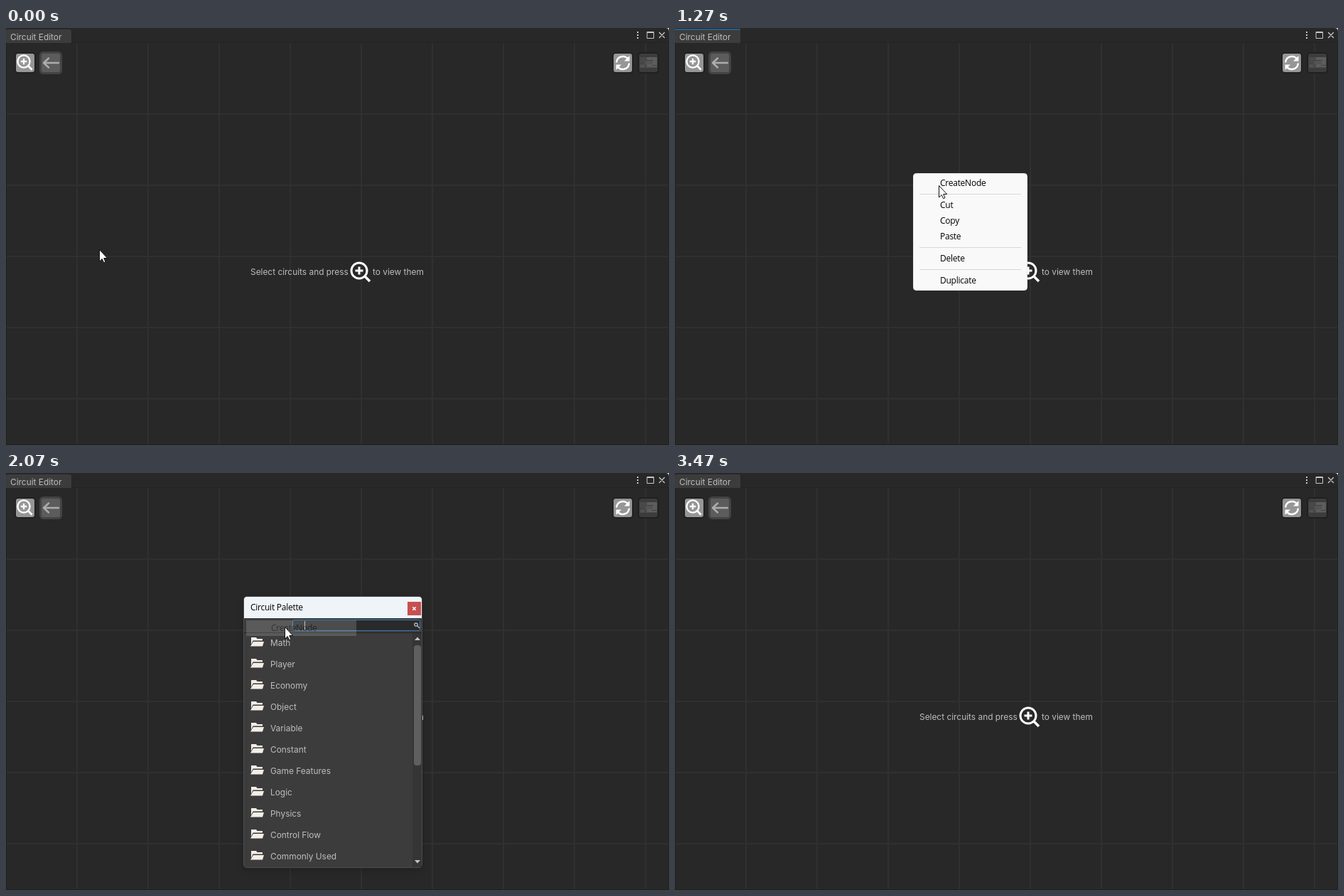
Animation, 933 px wide and 586 px high, one loop 3.54 s. Source, as an HTML page:

```html
<!DOCTYPE html>
<html lang="en">
<head>
<meta charset="utf-8">
<title>Circuit Editor</title>
<style>
  html, body { margin: 0; width: 100%; height: 100%; overflow: hidden; background: #282828; }
  svg { display: block; width: 100%; height: 100%; }
  text { white-space: pre; }
  .ui { font: 11.9px Inter, Roboto, sans-serif; fill: #bdbdbd; }
  .os { font: 12px "Open Sans", "Noto Sans", sans-serif; letter-spacing: -.25px; fill: #000; }
  .line { fill: none; stroke-linecap: round; stroke-linejoin: round; }
  #palette { filter: drop-shadow(0 3px 5px rgba(0, 0, 0, .2)); }
</style>
</head>
<body>
<svg viewBox="0 0 933 586">
  <defs>
    <g id="lens" class="line" stroke="#fff" stroke-width="3">
      <circle r="11"/>
      <path d="M-5.5 0H5.5M0-5.5V5.5" stroke-linecap="butt"/>
      <path d="M8 8L15 15" stroke-linecap="butt" stroke-width="3.6"/>
    </g>
    <g id="folder" fill="#f4eee9">
      <path d="M1 10V0H8L9.5 2H17V4.5H3.5Z"/>
      <path d="M0 12.5L4 6H19L17 12.5Z"/>
    </g>
  </defs>

  <rect width="933" height="586" fill="#282828"/>
  <path id="grid" fill="none" stroke="#303030" stroke-width="2"/>

  <rect y="20" width="933" height="1" fill="#222"/>
  <path d="M0 21V5Q0 2 3 2H89Q92 2 92 5V21Z" fill="#3c3c3c"/>
  <rect id="tabMark" y="1" width="92" height="2" fill="#2c5d87"/>
  <text class="ui" x="6" y="17">Circuit Editor</text>
  <path d="M.5 21V585.5H932.5V21" fill="none" stroke="#1f1f1f"/>
  <path d="M928 0H933V5Q933 0 928 0Z" fill="#ddd"/>

  <g fill="#c8c8c8">
    <rect x="888" y="5" width="2" height="2"/>
    <rect x="888" y="9" width="2" height="2"/>
    <rect x="888" y="13" width="2" height="2"/>
  </g>
  <g class="line" stroke="#c8c8c8">
    <rect x="902.5" y="5.5" width="9" height="9"/>
    <path d="M902.5 6.5H911.5"/>
    <path d="M919.5 6.5L926.5 13.5M926.5 6.5L919.5 13.5" stroke-width="1.4"/>
  </g>

  <g stroke="#202020" stroke-width="2">
    <rect x="13" y="35" width="28" height="28" rx="4" fill="#969696"/>
    <rect x="854" y="35" width="28" height="28" rx="4" fill="#969696"/>
    <rect x="890" y="35" width="28" height="28" rx="4" fill="#3c3c3c"/>
    <rect x="48.5" y="34.5" width="29" height="29" rx="4" fill="#5c5c5c" stroke="#434343" stroke-width="3"/>
  </g>
  <use href="#lens" transform="translate(25 47) scale(.78)"/>
  <path class="line" d="M53 49H74M60 42.5L53 49L60 55.5" stroke="#adadad" stroke-width="2.4"/>
  <g stroke="#fff">
    <g id="arc">
      <path class="line" d="M859.2 47.5A9 9 0 0 1 875.5 44" stroke-width="2.4"/>
      <path d="M877.5 39V46.5H870Z" fill="#fff" stroke="none"/>
    </g>
    <use href="#arc" transform="rotate(180 868 49)"/>
  </g>
  <g>
    <path d="M892 41H916V56H892Z" fill="#494949"/>
    <path d="M902 41H916V55H902Z" fill="#5d5d5d"/>
    <path d="M900 46H910V51H900ZM893 52H898V55H893Z" fill="#545454"/>
    <path d="M892 49H897V50H892ZM899 45H911V46H899ZM909 52H916V53H909Z" fill="#414141"/>
  </g>

  <text class="ui" x="344" y="347">Select circuits and press</text>
  <use href="#lens" x="497" y="341"/>
  <text class="ui" x="516" y="347">to view them</text>

  <g id="menu">
    <rect x="335.5" y="204.5" width="160" height="164" rx="4" fill="#f9f9f9" stroke="#e6e6e6"/>
    <path d="M344 233.5H487M344 308.5H487M344 339.5H487" stroke="#d7d7d7"/>
    <g id="menuText"></g>
  </g>

  <g id="palette">
    <rect x="334.5" y="173.5" width="251" height="381" rx="4.5" fill="#3c3c3c" stroke="#4c4c4c"/>
    <path id="caption" d="M335 204V178Q335 174 339 174H581Q585 174 585 178V204Z"/>
    <text class="os" x="344" y="193">Circuit Palette</text>
    <rect x="565" y="181" width="19" height="19" fill="#c75050"/>
    <path d="M572.3 188.3L576.7 192.7M576.7 188.3L572.3 192.7" stroke="#fff" stroke-width="1.5"/>
    <rect x="403.5" y="206.5" width="179" height="15" rx="2" fill="#2a2a2a" stroke="#3a79bb"/>
    <path d="M420.5 208V220" stroke="#b4b4b4"/>
    <g class="line" stroke="#c4c4c4" stroke-width="1.2">
      <circle cx="577" cy="213" r="2.2"/>
      <path d="M579 215L581.5 217.5"/>
    </g>
    <rect x="335" y="224" width="250" height="1" fill="#232323"/>
    <rect id="hover" x="335" width="237" height="30" fill="#303030"/>
    <g id="rows"></g>
    <rect x="572" y="225" width="13" height="329" fill="#353535"/>
    <rect x="574" y="242" width="10" height="169" rx="4" fill="#5f5f5f"/>
    <path d="M575 235L579 230.5L583 235ZM575 544L579 548.5L583 544Z" fill="#c4c4c4"/>
  </g>

  <g id="flash">
    <rect x="338" y="207" width="155" height="22" fill="#f0f0f0"/>
    <text class="os" x="373" y="222">CreateNode</text>
  </g>

  <path id="cursor" d="M.5 .5V17L4.2 13.5L6.7 18.7L9 17.7L6.7 12.5H11.7Z" fill="#fff" stroke="#111" stroke-linejoin="round"/>
</svg>
<script>
const LOOP = 3540, STEP = 200 / 3, LAST = 52;
const $ = id => document.getElementById(id);
const NS = "http://www.w3.org/2000/svg";

function add(parent, tag, attrs, text) {
  const el = document.createElementNS(NS, tag);
  for (const key in attrs) el.setAttribute(key, attrs[key]);
  if (text) el.textContent = text;
  parent.append(el);
}

let grid = "";
for (let x = 100; x < 933; x += 100) grid += `M${x} 21V585`;
for (let y = 121; y < 586; y += 100) grid += `M1 ${y}H932`;
$("grid").setAttribute("d", grid);

const commands = { CreateNode: 222, Cut: 253, Copy: 275, Paste: 297, Delete: 328, Duplicate: 359 };
for (const name in commands) {
  add($("menuText"), "text", { class: "os", x: 373, y: commands[name] }, name);
}

const groups = ["Math", "Player", "Economy", "Object", "Variable", "Constant",
  "Game Features", "Logic", "Physics", "Control Flow", "Commonly Used"];
groups.forEach((name, i) => {
  add($("rows"), "use", { href: "#folder", x: 344, y: 231 + 30 * i });
  add($("rows"), "text", { class: "ui", x: 372, y: 243 + 30 * i }, name);
});

const linear = p => p;
const smooth = p => p * p * (3 - 2 * p);
const easeOut = p => p * (1.25 - .25 * p);

// Pointer stops: tick, x, y, easing towards the stop
const stops = [
  [0, 131, 311, linear],
  [5, 336, 204, smooth],
  [8, 336, 204, linear],
  [12, 341, 207, smooth],
  [13, 341, 207, linear],
  [16, 349, 225, smooth],
  [22, 392, 216, smooth],
  [35, 392, 216, linear],
  [38, 373, 233, p => p * (.5 + .5 * p)],
  [43, 186, 483, easeOut],
  [45, 137, 546, linear]
];

function pointerAt(tick) {
  const i = stops.findIndex(s => s[0] >= tick);
  if (i < 0) return null;
  if (i === 0) return stops[0].slice(1, 3);
  const [t0, x0, y0] = stops[i - 1], [t1, x1, y1, ease] = stops[i];
  const p = ease((tick - t0) / (t1 - t0));
  return [Math.round(x0 + (x1 - x0) * p), Math.round(y0 + (y1 - y0) * p)];
}

const clamp = v => Math.max(0, Math.min(1, v));
const show = (id, on) => $(id).setAttribute("visibility", on ? "visible" : "hidden");

function draw(ms) {
  const tick = Math.min(LAST, Math.floor((ms % LOOP + 4) / STEP));
  const menuOpen = tick >= 9 && tick < 28;
  const paletteOpen = tick >= 28 && tick < LAST;

  show("tabMark", menuOpen);
  $("menu").setAttribute("opacity", menuOpen ? clamp((tick - 8) * .4) : 0);
  $("palette").setAttribute("opacity", paletteOpen ? 1 : 0);
  $("caption").setAttribute("fill", tick === 28 ? "#f3f3f3" : "#eff4f9");
  $("flash").setAttribute("opacity", paletteOpen ? clamp((32 - tick) * .17) : 0);

  const pos = pointerAt(tick);
  show("cursor", pos);
  let row = -1;
  if (pos) {
    const [x, y] = pos;
    $("cursor").setAttribute("transform", `translate(${x} ${y})`);
    if (x >= 335 && x < 572) row = Math.floor((y - 225) / 30);
  }
  const hovering = paletteOpen && row >= 0 && row < groups.length;
  show("hover", hovering);
  if (hovering) $("hover").setAttribute("y", 225 + 30 * row);
}

const start = performance.now();
function loop() {
  draw(performance.now() - start);
  requestAnimationFrame(loop);
}
loop();
</script>
</body>
</html>
```
